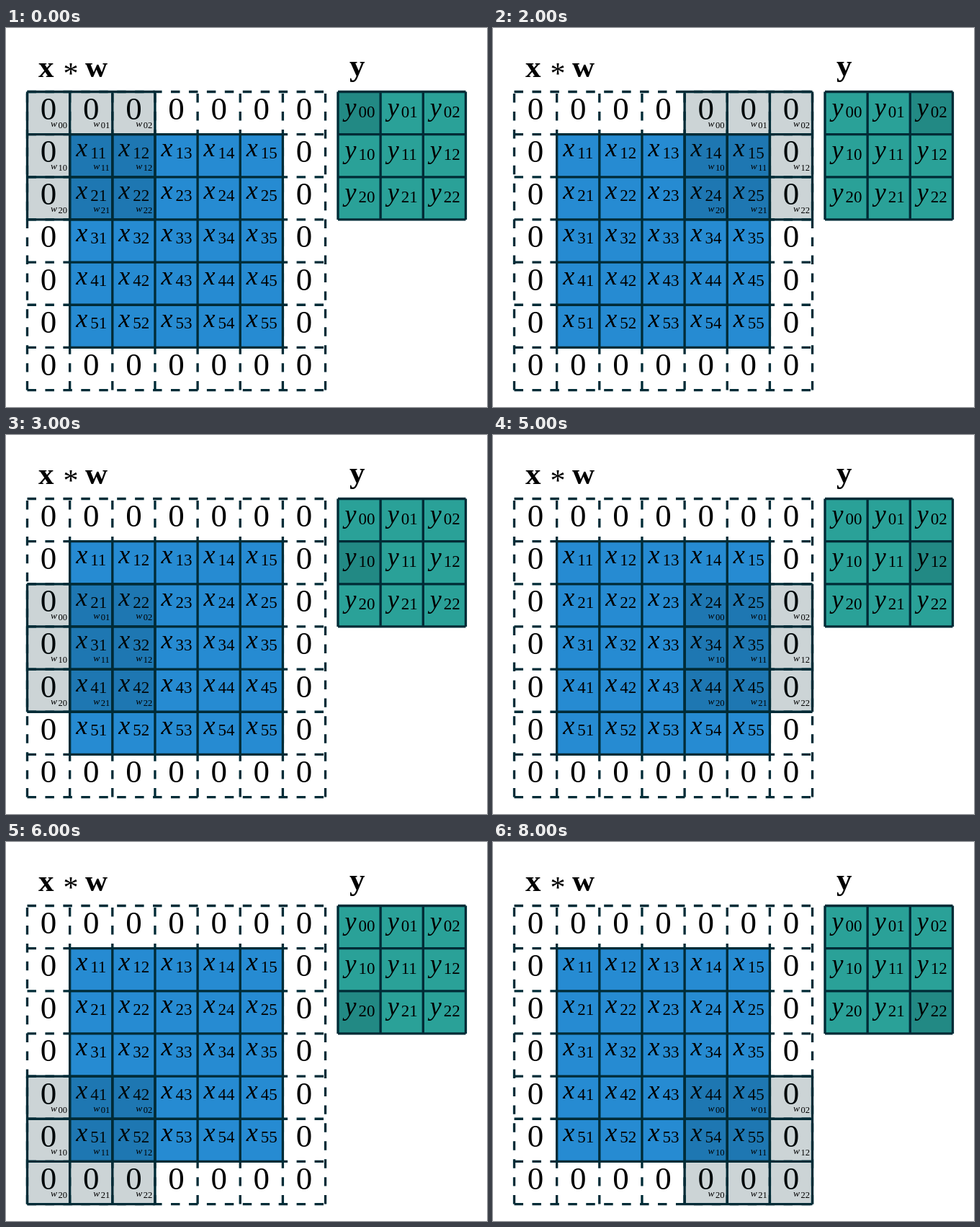
Write an HTML page that moves like this. It is 668 by 526 pixels and loops after 9 s.

```html
<!DOCTYPE html>
<html lang="en">
<head>
<meta charset="utf-8">
<title>Strided convolution with padding</title>
<style>
  html, body { margin: 0; width: 100%; height: 100%; overflow: hidden; background: #fff; }
  svg { display: block; width: 668px; height: 526px; }
  text { font-family: "Liberation Serif", "Noto Serif", serif; fill: #000; }
  .i { font-style: italic; }
  .b { font-weight: bold; }
  path { fill: none; stroke: #002b36; stroke-width: 3.33; }
  .shade { fill: #002b36; fill-opacity: .2; }
</style>
</head>
<body>
<svg id="stage" viewBox="0 0 668 526"></svg>
<script>
const CELL = 59.15, LEFT = 29.5, TOP = 88.5, OUT = 461;

const rect = (x, y, n, attrs) =>
  `<rect x="${x}" y="${y}" width="${n * CELL}" height="${n * CELL}" ${attrs}/>`;

const text = (x, y, size, str, attrs = '') =>
  `<text x="${x}" y="${y}" font-size="${size}" ${attrs}>${str}</text>`;

// Rows run left to right, columns bottom to top, so dashes start at the lower left.
function grid(x, y, n, attrs = '') {
  const size = n * CELL;
  let d = '';
  for (let k = 0; k <= n; k++)
    d += `M${x} ${y + k * CELL}h${size}M${x + k * CELL} ${y + size}v${-size}`;
  return `<path d="${d}" ${attrs}/>`;
}

function cells(n, draw) {
  let s = '';
  for (let r = 0; r < n; r++)
    for (let c = 0; c < n; c++) s += draw(r, c);
  return s;
}

const input = cells(7, (r, c) => {
  const x = LEFT + c * CELL, y = TOP + r * CELL;
  return r % 6 && c % 6
    ? text(x + 8.5, y + 30.5, 36, 'x', 'class="i"') + text(x + 28.5, y + 33, 23, `${r}${c}`)
    : text(x + CELL / 2, y + 38.5, 45, '0', 'text-anchor="middle"');
});

const output = cells(3, (r, c) => {
  const x = OUT + c * CELL, y = TOP + r * CELL;
  return text(x + 9.5, y + 33, 36, 'y', 'class="i"') + text(x + 28.5, y + 35.5, 23, `${r}${c}`);
});

const weights = cells(3, (r, c) => {
  const x = c * CELL, y = r * CELL;
  return text(x + 32.5, y + 48.5, 13.5, 'w', 'class="i"') + text(x + 43, y + 50.5, 12.5, `${r}${c}`);
});

document.getElementById('stage').innerHTML =
  text(45, 68, 43, 'x', 'class="b"') +
  text(90, 77, 42, '*', 'text-anchor="middle"') +
  text(110, 68, 43, 'w', 'class="b"') +
  text(477, 66, 43, 'y', 'class="b"') +
  grid(LEFT, TOP, 7, 'stroke-dasharray="12.47"') +
  rect(LEFT + CELL, TOP + CELL, 5, 'fill="#268bd2"') +
  grid(LEFT + CELL, TOP + CELL, 5) +
  rect(OUT, TOP, 3, 'fill="#2aa198"') +
  rect(OUT, TOP, 1, 'class="shade" id="result"') +
  grid(OUT, TOP, 3) +
  input + output +
  `<g id="kernel">${rect(0, 0, 3, 'class="shade"')}${grid(0, 0, 3)}${weights}</g>`;

const kernel = document.getElementById('kernel');
const result = document.getElementById('result');
const start = performance.now();

function frame() {
  const step = Math.floor((performance.now() - start) / 1000) % 9;
  const x = step % 3 * CELL, y = Math.floor(step / 3) * CELL;
  kernel.setAttribute('transform', `translate(${LEFT + 2 * x} ${TOP + 2 * y})`);
  result.setAttribute('transform', `translate(${x} ${y})`);
  requestAnimationFrame(frame);
}
frame();
</script>
</body>
</html>
```
